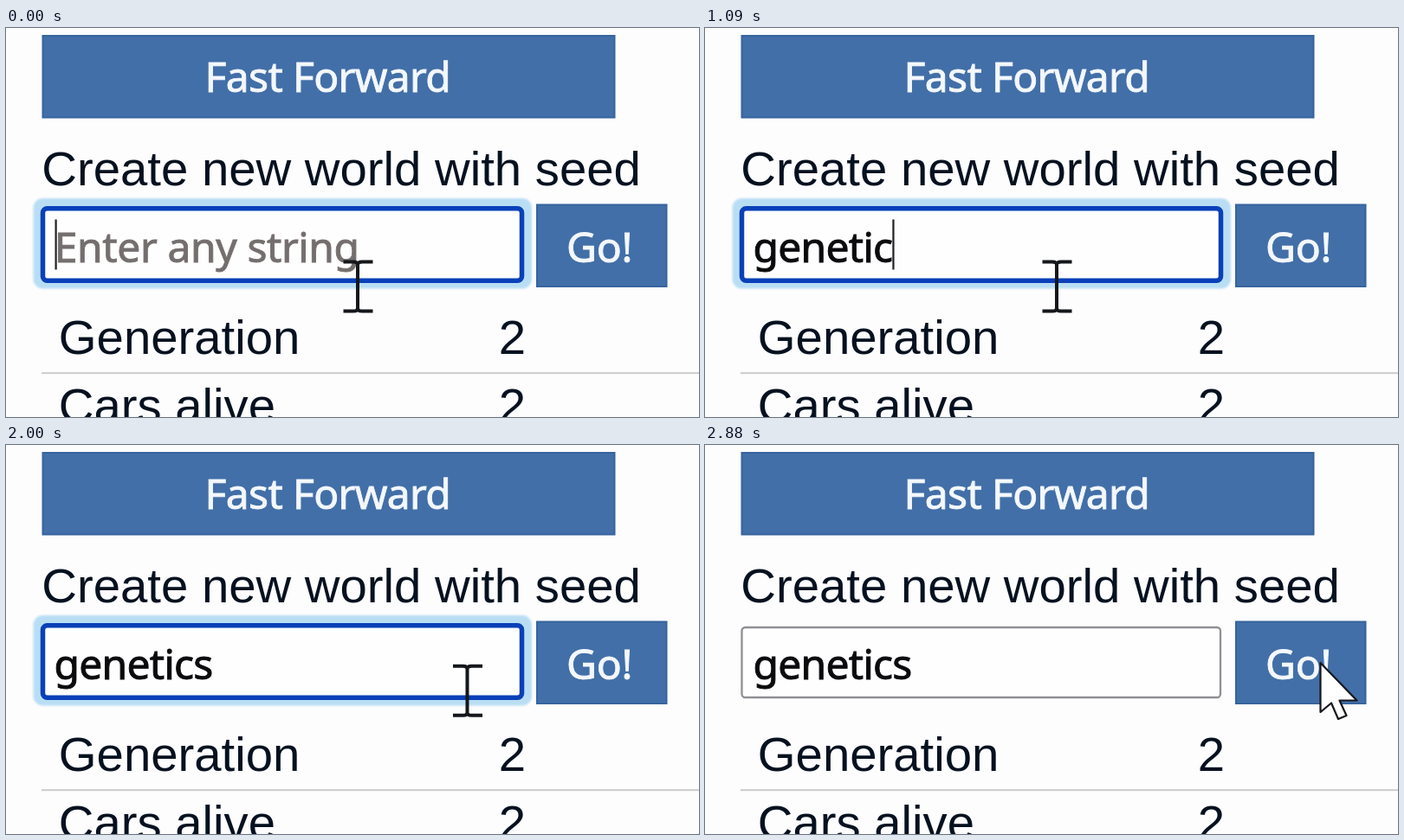
These frames come from a looping animation (800x450 px, 2.91 s). An HTML page:

```html
<!DOCTYPE html>
<html lang="en">
<head>
<meta charset="utf-8">
<title>Seed input</title>
<style>
  html, body { margin: 0; width: 100%; height: 100%; overflow: hidden; background: #fdfdfe; }
  svg { display: block; width: 800px; height: 450px; filter: blur(.75px); }
  text { white-space: pre; }
  .label { font: 56.3px "Liberation Sans", Arial, sans-serif; fill: #06111f; }
  .ui { font: 48px "Noto Sans", "Open Sans", sans-serif; stroke-width: .9; }
  .button { fill: #426fa8; stroke: #37649e; stroke-width: 2; }
  .caption { fill: #f4f8fd; stroke: #f4f8fd; }
  .hint { fill: #746f6e; stroke: #746f6e; }
  .typed { fill: #0b0b0e; stroke: #0b0b0e; }
  .glow { fill: #b9def4; filter: blur(1px); }
  .pointer { fill: #fff; stroke: #16161c; stroke-width: 2.2; stroke-linejoin: round; }
</style>
</head>
<body>
<svg viewBox="0 0 800 450">
  <rect class="button" x="42.5" y="9" width="660" height="94.5"/>
  <text class="ui caption" x="229.5" y="74" letter-spacing="-.65">Fast Forward</text>
  <text class="label" x="41.3" y="182">Create new world with seed</text>

  <g id="focused">
    <rect class="glow" x="31.5" y="197" width="575.5" height="104.5" rx="11"/>
    <rect x="42.5" y="208.8" width="553" height="83.5" rx="5" fill="#fefefe" stroke="#0a40b8" stroke-width="5.5"/>
  </g>
  <rect id="plain" x="42.5" y="211" width="552.5" height="81" rx="4" fill="#fefefe" stroke="#918e94" stroke-width="2.3"/>
  <text id="hint" class="ui hint" x="55.8" y="270.5" letter-spacing="-.4">Enter any string</text>
  <text id="typed" class="ui typed" x="55.5" y="270.5" letter-spacing="-.75"></text>
  <rect id="caret" y="221.5" width="2.2" height="58" fill="#202024"/>

  <rect class="button" x="613" y="204.5" width="149.5" height="94.5"/>
  <text class="ui caption" x="647" y="270.5" letter-spacing="-.3">Go!</text>

  <text class="label" x="60.8" y="377">Generation</text>
  <text class="label" x="568.8" y="377">2</text>
  <rect x="41" y="398.2" width="759" height="2" fill="#cbcbcd"/>
  <text class="label" x="60.8" y="455.5">Cars alive</text>
  <text class="label" x="568.8" y="455.5">2</text>

  <g id="beam" fill="none" stroke="#15171b" stroke-width="4">
    <path d="M-16.5-28.5H-5Q0-28.5 0-25Q0-28.5 5-28.5H17.5M-16.5 28.5H-5Q0 28.5 0 25Q0 28.5 5 28.5H17.5M0-26V26"/>
  </g>
  <g id="hand" class="pointer">
    <path d="M-5.5 6Q-5.5 0 0 0Q5.5 0 5.5 6V20Q11 16 15.5 22Q21 18 25.5 24Q33 21 35 29V47Q34 57 27 68Q22 76 11 76Q0 75-6 67L-24 46Q-27 41-22 38.5Q-18 36-13 40L-5.5 46Z"/>
    <path fill="none" d="M5.5 19V35M15.5 22V36M25.5 24V36"/>
  </g>
  <path id="arrow" class="pointer" d="M0 0V57L12.5 46.5L20.5 65L30 61L22 43.5H42Z"/>
</svg>
<script>
  const LOOP = 2910;
  const WORD = "genetics";
  const KEY_TIMES = [380, 490, 590, 690, 810, 920, 1030, 1200];
  const MOVE = { start: 1700, length: 710 };
  const CLICK = 2715, RELEASE = 2775, BLINK = 500;

  const el = id => document.getElementById(id);
  const [focused, plain, hint, typed, caret] = ["focused", "plain", "hint", "typed", "caret"].map(el);
  const cursors = { beam: el("beam"), hand: el("hand"), arrow: el("arrow") };
  const show = (node, on) => node.setAttribute("visibility", on ? "visible" : "hidden");

  function drawField(t) {
    const count = KEY_TIMES.filter(k => k <= t).length;
    const active = t < CLICK;
    const lastKey = count ? KEY_TIMES[count - 1] : 0;
    const lit = Math.floor((t - lastKey) / BLINK) % 2 === 0;
    typed.textContent = WORD.slice(0, count);
    show(hint, count === 0);
    show(focused, active);
    show(plain, !active);
    show(caret, active && lit);
    caret.setAttribute("x", count ? 55.5 + typed.getComputedTextLength() : 56.5);
  }

  function drawCursor(t) {
    const u = Math.min(1, Math.max(0, (t - MOVE.start) / MOVE.length));
    const p = u * u * (3 - 2 * u);
    let x = 406 + 327 * p, y = 299 - 51 * p ** 1.3;
    let kind = x < 598 ? "beam" : x < 612 ? "arrow" : "hand";
    if (t >= RELEASE) [kind, x, y] = ["arrow", 710.5, 252];
    for (const name in cursors) show(cursors[name], name === kind);
    cursors[kind].setAttribute("transform", `translate(${x} ${y})`);
  }

  const origin = performance.now();
  function frame() {
    const t = (performance.now() - origin) % LOOP;
    drawField(t);
    drawCursor(t);
    requestAnimationFrame(frame);
  }
  frame();
</script>
</body>
</html>
```
